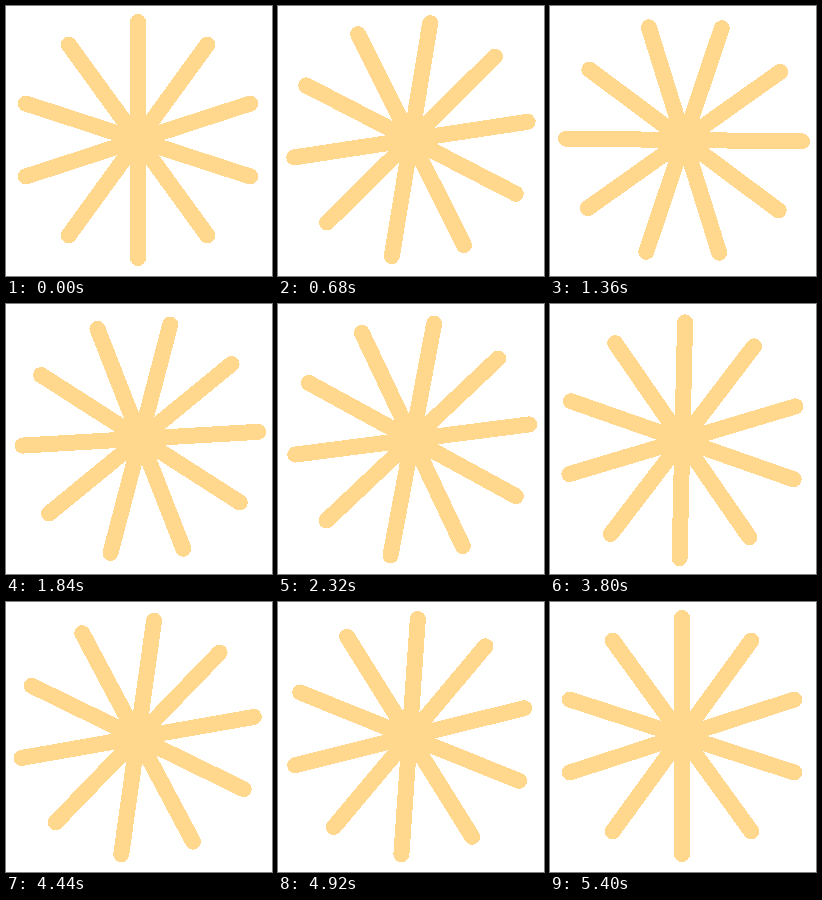
Recreate the animation shown at these times as an HTML page. Size 266 by 270 pixels, loop 5.44 s.

```html
<!DOCTYPE html>
<html lang="en">
<head>
<meta charset="utf-8">
<title>Spinning burst</title>
<style>
  html, body { margin: 0; width: 100%; height: 100%; overflow: hidden; background: #fff; }
  svg { display: block; }
  path { stroke: #ffd88e; stroke-width: 16; stroke-linecap: round; }
</style>
</head>
<body>
<svg width="266" height="270" viewBox="0 0 266 270" shape-rendering="crispEdges">
  <g id="burst"><path id="spokes"/></g>
</svg>
<script>
  const burst = document.getElementById('burst');
  const LOOP = 5440, STEP = 40;
  const LAST = LOOP / STEP - 1; // the last step completes the turn
  const REACH = 118;

  // Five full-length bars, 36 degrees apart
  let d = '';
  for (let i = 0; i < 5; i++) {
    const a = i * Math.PI / 5;
    const x = REACH * Math.sin(a), y = REACH * Math.cos(a);
    d += `M${-x} ${y}L${x} ${-y}`;
  }
  document.getElementById('spokes').setAttribute('d', d);

  // The burst sits slightly off the pivot, so it wobbles as it turns
  function draw(now) {
    const step = Math.floor(now % LOOP / STEP);
    burst.setAttribute('transform', `translate(133 135) rotate(${360 * step / LAST}) translate(-1 -1)`);
  }

  const start = performance.now();
  function tick() {
    draw(performance.now() - start);
    requestAnimationFrame(tick);
  }
  tick();
</script>
</body>
</html>
```
